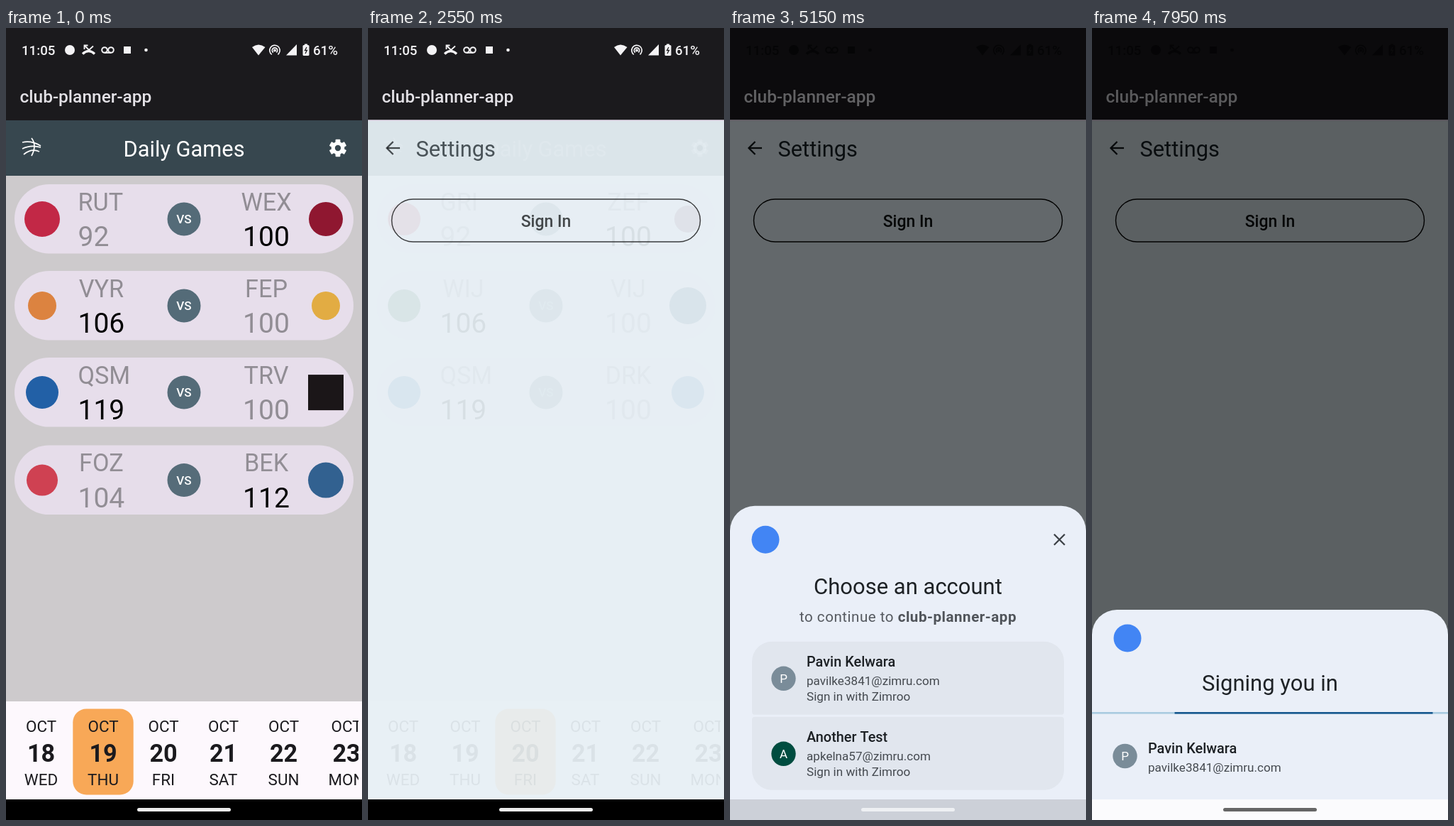
Write an HTML page with a canvas that moves like this. It is 502x1115 px and loops after 8 s.

```html
<!DOCTYPE html>
<html lang="en">
<head>
<meta charset="utf-8">
<style>
html, body { margin: 0; width: 100%; height: 100%; overflow: hidden; background: #000; }
canvas { display: block; width: 502px; height: 1115px; }
</style>
</head>
<body>
<canvas id="stage"></canvas>
<script>
const W = 502, H = 1115, LOOP = 8000;
const APP = 'club-planner-app';
const canvas = document.getElementById('stage');
const ctx = canvas.getContext('2d');
const ratio = window.devicePixelRatio || 1;
canvas.width = W * ratio;
canvas.height = H * ratio;

const clamp = v => v < 0 ? 0 : v > 1 ? 1 : v;
const mix = (a, b, k) => a + (b - a) * k;

function bezier(x1, y1, x2, y2) {
  const at = (a, b, s) => 3 * a * s * (1 - s) ** 2 + 3 * b * s * s * (1 - s) + s ** 3;
  return x => {
    if (x <= 0) return 0;
    if (x >= 1) return 1;
    let lo = 0, hi = 1;
    for (let i = 0; i < 24; i++) {
      const half = (lo + hi) / 2;
      if (at(x1, x2, half) < x) lo = half; else hi = half;
    }
    return at(y1, y2, lo);
  };
}
const standard = bezier(0.4, 0, 0.2, 1);

// Drawing helpers
function rect(x, y, w, h, color) {
  ctx.fillStyle = color;
  ctx.fillRect(x, y, w, h);
}
function round(x, y, w, h, r, color) {
  ctx.beginPath();
  ctx.roundRect(x, y, w, h, r);
  ctx.fillStyle = color;
  ctx.fill();
}
function disc(x, y, r, color) {
  ctx.beginPath();
  ctx.arc(x, y, r, 0, 7);
  ctx.fillStyle = color;
  ctx.fill();
}
function line(points, color, width) {
  ctx.beginPath();
  points.forEach(([x, y], i) => i ? ctx.lineTo(x, y) : ctx.moveTo(x, y));
  ctx.strokeStyle = color;
  ctx.lineWidth = width;
  ctx.stroke();
}
function curve(x1, y1, cx, cy, x2, y2, color, width) {
  ctx.beginPath();
  ctx.moveTo(x1, y1);
  ctx.quadraticCurveTo(cx, cy, x2, y2);
  ctx.strokeStyle = color;
  ctx.lineWidth = width;
  ctx.stroke();
}
function setFont(size, weight = 400) {
  ctx.font = `${weight} ${size}px Roboto, sans-serif`;
}
function text(str, x, y, size, color, weight = 400, align = 'left') {
  setFont(size, weight);
  ctx.textAlign = align;
  ctx.fillStyle = color;
  ctx.fillText(str, x, y);
}
function layer(alpha, draw) {
  if (alpha <= 0) return;
  ctx.save();
  ctx.globalAlpha *= alpha;
  draw();
  ctx.restore();
}

// System bars
function statusBar(c) {
  text('11:05', 22, 37.5, 18.7, c, 500);
  disc(90, 31, 7, c);
  curve(108, 36.5, 116.5, 28.5, 125, 36.5, c, 3.4);
  line([[111, 25], [117, 31], [123, 25.5]], c, 1.8);
  line([[110.5, 30], [110.5, 24.5], [115.5, 24.5]], c, 1.8);
  ctx.lineWidth = 2;
  for (const x of [139, 148]) {
    ctx.beginPath();
    ctx.arc(x, 31, 3.8, 0, 7);
    ctx.stroke();
  }
  line([[139, 34.8], [148, 34.8]], c, 2);
  rect(166, 26, 10, 10, c);
  disc(197.5, 31, 2.3, c);

  ctx.fillStyle = c;
  ctx.beginPath();
  ctx.moveTo(356, 38.5);
  ctx.lineTo(347, 27);
  ctx.quadraticCurveTo(356, 20, 365.5, 27);
  ctx.fill();
  ctx.beginPath();
  ctx.moveTo(395, 38.5);
  ctx.lineTo(410, 38.5);
  ctx.lineTo(410, 23);
  ctx.fill();
  for (const r of [3.7, 7.2]) {
    ctx.beginPath();
    ctx.arc(379, 31.5, r, 2.2, 7.2);
    ctx.lineWidth = 1.7;
    ctx.stroke();
  }
  disc(379, 31.5, 1.9, c);
  round(418.5, 24, 9, 15, 1.5, c);
  rect(421, 22.5, 4, 2, c);
  line([[424, 27], [421.5, 31.5], [424.5, 31.5], [422, 36]], '#1b1a1d', 1.3);
  text('61%', 433, 37.5, 18.7, c, 500);
}
function homePill(color) {
  round(185, 1098, 132, 5, 2.5, color);
}
function appBar(statusColor) {
  rect(0, 0, W, 130, '#1b1a1d');
  statusBar(statusColor);
  text(APP, 19.5, 105, 24.5, '#e3e1e6', 500);
}

// Daily games
const team = (name, score, color, r, square) => ({ name, score, color, r, square });
const thursday = [
  [team('RUT', 92, '#c22846', 25), team('WEX', 100, '#8f1730', 24)],
  [team('VYR', 106, '#dc8340', 20), team('FEP', 100, '#e2ac43', 20)],
  [team('QSM', 119, '#2260a6', 23), team('TRV', 100, '#1b1618', 25, true)],
  [team('FOZ', 104, '#cf3f50', 22), team('BEK', 112, '#30608f', 25)]
];
const friday = [
  [team('GRI', 92, '#c41d37', 23), team('ZEF', 100, '#71284a', 19)],
  [team('WIJ', 106, '#23512f', 23), team('VIJ', 100, '#214468', 26)],
  [team('QSM', 119, '#2260a6', 23), team('DRK', 100, '#2d68a8', 23)]
];

function badge(x, y, { color, r, square }) {
  if (square) rect(x - r, y - r, 2 * r, 2 * r, color);
  else disc(x, y, r, color);
}
function gameCard(y, [home, away]) {
  const gray = '#918d94';
  const shade = (a, b) => a.score > b.score ? '#000' : gray;
  round(12, y, 478, 97.5, 48.7, '#e7deeb');
  badge(51, y + 49, home);
  badge(451, y + 49, away);

  setFont(34.2);
  const nameWidth = ctx.measureText(home.name).width;
  setFont(39);
  const column = Math.max(nameWidth, ctx.measureText(home.score).width);
  text(home.name, 101.5 + column / 2, y + 36.5, 34.2, gray, 400, 'center');
  text(home.score, 101.5, y + 87, 39, shade(home, away));
  text(away.name, 367, y + 36.5, 34.2, gray, 400, 'center');
  text(away.score, 367, y + 87, 39, shade(away, home), 400, 'center');

  disc(251, y + 49, 23.5, '#546b78');
  text('VS', 251, y + 55, 17.1, '#fff', 500, 'center');
}
// Critically damped spring: share of the way still to go.
function springLeft(ms) {
  const k = ms / 50;
  return (1 + k) * Math.exp(-k);
}
function gameList(games, t, start) {
  games.forEach((game, i) => {
    const age = t - start - i * 150;
    if (age <= 0) return;
    const left = springLeft(age);
    layer(1 - left, () => gameCard(220 + i * 122 + 150 * left, game));
  });
}

function ballIcon() {
  const c = '#fff';
  curve(23, 161, 36, 158, 49, 166, c, 1.7);
  curve(23, 170, 35, 164, 49, 168, c, 1.7);
  curve(25, 178, 36, 169, 47, 174, c, 1.7);
  curve(36, 155, 44, 165, 36, 180, c, 1.7);
}
function gearIcon(x, y) {
  disc(x, y, 9.3, '#fff');
  ctx.save();
  ctx.translate(x, y);
  for (let i = 0; i < 6; i++) {
    round(-3.4, -12.2, 6.8, 6, 1, '#fff');
    ctx.rotate(Math.PI / 3);
  }
  ctx.restore();
  disc(x, y, 4.2, '#37474f');
}
function dateStrip(selected) {
  rect(0, 948, W, 138, '#fdf8fd');
  const days = ['WED', 'THU', 'FRI', 'SAT', 'SUN', 'MON'];
  const centers = [49.5, 137, 222, 306.5, 391.5, 480];
  round(centers[selected] - 42.7, 958.5, 85.4, 121, 19, '#f8a857');
  ctx.save();
  ctx.beginPath();
  ctx.rect(0, 948, 497, 138);
  ctx.clip();
  days.forEach((day, i) => {
    const put = (str, y, size, weight) => text(str, centers[i], y, size, '#1b1a1e', weight, 'center');
    put('OCT', 990.5, 22.4, 400);
    put(18 + i, 1032.5, 34.2, 700);
    put(day, 1066, 22.4, 400);
  });
  ctx.restore();
}
function gamesScreen(t) {
  rect(0, 130, W, 956, '#cdcacc');
  const onFriday = t >= 550;
  if (onFriday) gameList(friday, t, 580);
  else gameList(thursday, t, -777);
  rect(0, 130, W, 78, '#37474f');
  ballIcon();
  text('Daily Games', 251, 181, 30.8, '#fff', 400, 'center');
  gearIcon(468, 169);
  dateStrip(onFriday ? 2 : 1);
}

// Settings
function settingsScreen() {
  rect(0, 130, W, 956, '#e4f1f6');
  rect(0, 129, W, 2, '#e3d8ea');
  line([[45, 169], [27, 169]], '#111619', 2.3);
  line([[35.5, 160], [26.5, 169], [35.5, 178]], '#111619', 2.3);
  text('Settings', 67.5, 181, 30.8, '#172025');
  ctx.beginPath();
  ctx.roundRect(33.5, 241, 435, 60, 30);
  ctx.strokeStyle = '#000';
  ctx.lineWidth = 1.4;
  ctx.stroke();
  text('Sign In', 251, 280, 23, '#0c0f10', 500, 'center');
}

// Account sheet
const accounts = [
  { name: 'Pavin Kelwara', mail: 'pavilke3841@zimru.com', color: '#7a8c99' },
  { name: 'Another Test', mail: 'apkelna57@zimru.com', color: '#004d40' }
];
function avatar(x, y, { name, color }) {
  disc(x, y, 17.2, color);
  text(name[0], x, y + 6, 17, '#fff', 400, 'center');
}
function person(x, y, { name, mail }) {
  text(name, x, y, 19.9, '#1c2024', 500);
  text(mail, x, y + 26, 17.1, '#454a50');
}
function chooser(top) {
  const x = 464.5, y = top + 47.5, r = 7.5;
  line([[x - r, y - r], [x + r, y + r]], '#3c4146', 2.3);
  line([[x - r, y + r], [x + r, y - r]], '#3c4146', 2.3);
  text('Choose an account', 251, top + 124, 31, '#1e2226', 400, 'center');

  ctx.letterSpacing = '0.5px';
  const lead = 'to continue to ';
  setFont(20.6);
  const leadWidth = ctx.measureText(lead).width;
  setFont(20.6, 700);
  const left = 251 - (leadWidth + ctx.measureText(APP).width) / 2;
  text(lead, left, top + 163, 20.6, '#565a60');
  text(APP, left + leadWidth, top + 163, 20.6, '#50545a', 700);
  ctx.letterSpacing = '0px';

  accounts.forEach((account, i) => {
    const y = top + 191 + i * 106;
    const radii = i ? [4, 4, 28, 28] : [28, 28, 4, 4];
    round(31, y, 440, 103, radii, '#e1e6ee');
    avatar(75.5, y + 52, account);
    person(108, y + 35, account);
    text('Sign in with Zimroo', 108, y + 83.5, 17.1, '#454a50');
  });
}

const firstHead = bezier(0.2, 0, 0.8, 1), firstTail = bezier(0.4, 0, 1, 1);
const secondHead = bezier(0, 0, 0.65, 1), secondTail = bezier(0.1, 0, 0.45, 1);
function progressBar(y, ms) {
  rect(0, y, W, 2.6, '#a9cbe0');
  const phase = ms < 0 ? 0 : ms % 1800;
  const bar = (tail, head) => rect(tail * W, y, (head - tail) * W, 2.6, '#17588f');
  bar(firstTail((phase - 333) / 850), firstHead(phase / 750));
  bar(secondTail((phase - 1267) / 533), secondHead((phase - 1000) / 567));
}
function signing(top, t) {
  text('Signing you in', 251, top + 114, 31, '#1e2226', 400, 'center');
  progressBar(top + 144, t - 7270);
  avatar(46.5, top + 206, accounts[0]);
  person(79, top + 202, accounts[0]);
}
function accountSheet(t) {
  const age = t - 4840;
  rect(0, 0, W, H, `rgba(0,0,0,${0.6 * clamp(age / 330)})`);
  const shift = 89 * (1 - clamp(age / 510)) ** 5;
  const collapse = standard(clamp((t - 7000) / 300));
  const top = 672 + 147 * collapse + shift;
  layer(1 - (1 - clamp(age / 200)) ** 3, () => {
    ctx.beginPath();
    ctx.roundRect(0, top, W, H - top + 40, [35, 35, 0, 0]);
    ctx.fillStyle = '#eaeff8';
    ctx.fill();
    ctx.clip();
    disc(50, top + mix(47.5, 40, collapse), 19.5, '#4285f4');
    layer(1 - 2 * collapse, () => chooser(top));
    layer(2 * collapse - 1, () => signing(top, t));
  });

  if (age < 360) {
    rect(0, 1086, W, 29, 'rgba(0,0,0,0.13)');
    homePill('#eef0f3');
  } else {
    rect(0, 1086, W, 29, '#fbfbfd');
    const tone = Math.round(mix(163, 102, clamp((t - 5860) / 250)));
    homePill(`rgb(${tone},${tone},${tone})`);
  }
}

function render(t) {
  ctx.setTransform(ratio, 0, 0, ratio, 0, 0);
  rect(0, 0, W, H, '#000');
  const sheetOpen = t >= 4850;
  appBar(sheetOpen ? '#0c0b0e' : '#f4f3f5');
  const swap = standard(clamp((t - 2325) / 475));
  rect(0, 130, W, 956, '#fdf8fd');
  layer(1 - swap, () => gamesScreen(t));
  layer(swap, settingsScreen);
  if (sheetOpen) accountSheet(t);
  else homePill('#ececec');
}

const began = performance.now();
function tick() {
  render((performance.now() - began) % LOOP);
  requestAnimationFrame(tick);
}
tick();
</script>
</body>
</html>
```
